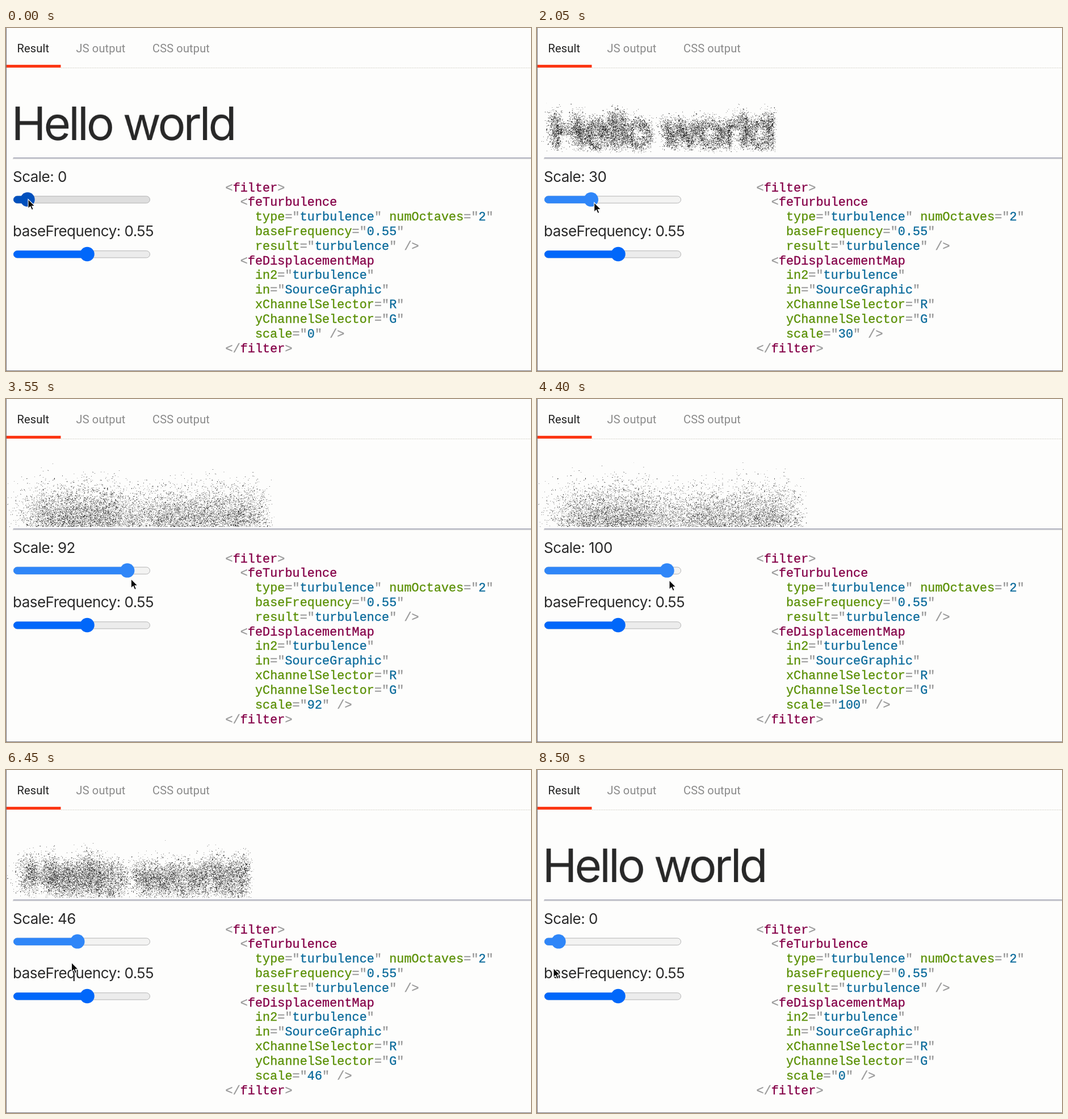
Animation of 925x606 px, one loop 8550 ms. Source, as an HTML page with a canvas:

```html
<!DOCTYPE html>
<html lang="en">
<head>
<meta charset="utf-8">
<title>Displacement filter</title>
<style>
html, body { margin: 0; width: 100%; height: 100%; overflow: hidden; background: #fdfdfc; }
svg, canvas { position: absolute; left: 0; }
svg { top: 0; }
#heading { top: 106px; width: 500px; height: 120.3125px; }
.tab { font: 20px Roboto, sans-serif; letter-spacing: .15px; fill: #8a8a8a; }
.label { font: 26px Inter, sans-serif; letter-spacing: -.52px; fill: #2a2a2a; }
.code { font: 21.87px "Liberation Mono", monospace; white-space: pre; color: #999; }
.code tspan { fill: currentColor; stroke: currentColor; stroke-width: .35px; }
.tag { color: #850048; }
.attr { color: #5c9108; }
.val { color: #0d6c9c; }
</style>
</head>
<body>
<canvas id="heading" width="640" height="154"></canvas>
<svg id="stage" width="925" height="606" viewBox="0 0 925 606">
  <path d="M.5 0V606M0 605.5H925" stroke="#77757f"/>
  <path d="M97 70.5H925" stroke="#d9d7cf" stroke-dasharray="2 1"/>
  <rect x="1" y="65" width="95.5" height="5" fill="#fc3714"/>
  <text class="tab" x="19.5" y="43" style="fill:#222">Result</text>
  <text class="tab" x="123.5" y="43">JS output</text>
  <text class="tab" x="258" y="43">CSS output</text>
  <path d="M12 229.7H925" stroke="#83869a" stroke-width="1.2"/>
  <path d="M12 231.4H925M12.5 229V232" stroke="#dcdcdc"/>
  <text class="label" id="scale" x="12" y="271.5"></text>
  <text class="label" x="12" y="368">baseFrequency: 0.55</text>
  <g id="sliders"></g>
  <g id="code"></g>
  <path id="cursor" d="M0 0V16.6L3.8 13L6.4 19L9.2 17.8L6.7 12H11.9Z" fill="#0a0a0a" stroke="#fff" stroke-width="1.1"/>
</svg>
<script>
const LOOP = 8550, STEP = 50, PRESS = 600;
const $ = id => document.getElementById(id);
const el = (parent, name, attrs, text) => {
  const node = document.createElementNS("http://www.w3.org/2000/svg", name);
  for (const k in attrs) node.setAttribute(k, attrs[k]);
  if (text) node.textContent = text;
  return parent.appendChild(node);
};

// Code listing
const listing = `<filter>
  <feTurbulence
    type="turbulence" numOctaves="2"
    baseFrequency="0.55"
    result="turbulence" />
  <feDisplacementMap
    in2="turbulence"
    in="SourceGraphic"
    xChannelSelector="R"
    yChannelSelector="G"
    scale="0" />
</filter>`;
let scaleValue;
listing.split("\n").forEach((line, row) => {
  const text = el($("code"), "text", { class: "code", x: 386.5, y: 288.5 + row * 25.82 });
  let last = "";
  for (const part of line.match(/\w[\w.]*|\W/g)) {
    const cls = !/\w/.test(part) ? "" : last === '"' ? "val" : /[<\/]/.test(last) ? "tag" : "attr";
    const span = el(text, "tspan", { class: cls }, part);
    if (cls === "val" && line.includes("scale=")) scaleValue = span;
    last = part;
  }
});

// Range sliders
const thumbX = part => 38 + 191 * part;
function makeSlider(y) {
  const box = { x: 13.5, y: y - 5.8, height: 12.2, rx: 6.1 };
  const track = el($("sliders"), "rect", { ...box, width: 240, stroke: "#b4b4b4" });
  const bar = el($("sliders"), "rect", { ...box, "stroke-opacity": .9 });
  const thumb = el($("sliders"), "circle", { cy: y, r: 12.7 });
  return (part, color, back) => {
    const x = thumbX(part);
    track.setAttribute("fill", back);
    bar.setAttribute("width", x - 13.5);
    bar.setAttribute("fill", color);
    bar.setAttribute("stroke", color);
    thumb.setAttribute("cx", x);
    thumb.setAttribute("fill", color);
  };
}
const setScale = makeSlider(302.9);
makeSlider(399.5)(.55, "#0067fa", "#ececec");

// Smooth monotone curve through [time, value] points
function curve(points) {
  const slope = points.slice(1).map(([t, v], i) => (v - points[i][1]) / (t - points[i][0]));
  const tangent = points.map((_, i) => {
    const a = slope[i - 1], b = slope[i];
    return a * b > 0 ? 2 * a * b / (a + b) : 0;
  });
  return t => {
    let i = 0;
    while (i < slope.length - 1 && t >= points[i + 1][0]) i++;
    const [t0, v0] = points[i], [t1, v1] = points[i + 1];
    const w = t1 - t0, u = (t - t0) / w, n = 1 - u;
    return v0 * (1 + 2 * u) * n * n + tangent[i] * w * u * n * n
         + v1 * u * u * (3 - 2 * u) - tangent[i + 1] * w * u * u * n;
  };
}
const scaleAt = curve([[0, 0], [700, 0], [1300, 7], [2950, 67], [3950, 100],
  [4700, 100], [5450, 85], [6450, 46], [7700, 0], [8550, 0]]);
const cursorX = curve([[0, 39], [700, 40], [1300, 55], [2950, 171], [3950, 237],
  [4400, 233], [5450, 198], [6450, 115.5], [7700, 30], [8550, 29]]);
const cursorY = curve([[0, 302.5], [1300, 303.5], [2950, 316], [4400, 320],
  [5450, 327], [6450, 340], [8550, 350]]);

// Perlin turbulence as defined for feTurbulence, seed 0
let seed = 1;
const random = () => seed = seed * 16807 % 2147483647;
const lattice = Array.from({ length: 256 }, (_, i) => i);
const gradients = [0, 1, 2, 3].map(() => lattice.map(() => {
  const x = random() % 512 - 256, y = random() % 512 - 256, len = Math.hypot(x, y) || 1;
  return [x / len, y / len];
}));
for (let i = 255; i > 0; i--) {
  const j = random() % 256;
  [lattice[i], lattice[j]] = [lattice[j], lattice[i]];
}
const ease = t => t * t * (3 - 2 * t);
const mix = (a, b, t) => a + (b - a) * t;
function noise(grad, x, y) {
  const ix = Math.floor(x), iy = Math.floor(y), fx = x - ix, fy = y - iy;
  const corner = (dx, dy) => {
    const g = grad[lattice[(lattice[(ix + dx) & 255] + iy + dy) & 255]];
    return g[0] * (fx - dx) + g[1] * (fy - dy);
  };
  const sx = ease(fx);
  return mix(mix(corner(0, 0), corner(1, 0), sx), mix(corner(0, 1), corner(1, 1), sx), ease(fy));
}
const turbulence = (channel, x, y) => Math.min(1,
  Math.abs(noise(gradients[channel], x, y)) + Math.abs(noise(gradients[channel], 2 * x, 2 * y)) / 2);

// Heading, displaced on a grid of two samples per page unit
const canvas = $("heading"), W = canvas.width, H = canvas.height, DENSITY = 1.28, FREQ = .55;
const ctx = canvas.getContext("2d", { willReadFrequently: true });
const shiftX = new Float32Array(W * H), shiftY = new Float32Array(W * H);
for (let y = 0, i = 0; y < H; y++) {
  for (let x = 0; x < W; x++, i++) {
    const u = (x - 16) / 2 * FREQ + 4096, v = (y - 13) / 2 * FREQ + 4096;
    // Colours pass through 8-bit premultiplied alpha
    const alpha = Math.round(255 * turbulence(3, u, v));
    const shift = channel => 2 * (alpha && Math.round(alpha * turbulence(channel, u, v)) / alpha) - 1;
    shiftX[i] = shift(0);
    shiftY[i] = shift(1);
  }
}
ctx.scale(DENSITY, DENSITY);
ctx.font = "82px Inter, sans-serif";
ctx.letterSpacing = "-4.05px";
ctx.fillStyle = "#282828";
ctx.fillText("Hello world", 9.5, 92);
const plain = ctx.getImageData(0, 0, W, H);
const moved = ctx.createImageData(W, H);
const from = new Uint32Array(plain.data.buffer), to = new Uint32Array(moved.data.buffer);

function displace(scale) {
  for (let y = 0, i = 0; y < H; y++) {
    for (let x = 0; x < W; x++, i++) {
      const sx = Math.floor(x + .5 + scale * shiftX[i]), sy = Math.floor(y + .5 + scale * shiftY[i]);
      to[i] = sx >= 0 && sx < W && sy >= 0 && sy < H ? from[sy * W + sx] : 0;
    }
  }
  ctx.putImageData(moved, 0, 0);
}

let shown = -1;
function draw(now) {
  const t = Math.floor(now % LOOP / STEP) * STEP;
  const scale = Math.round(scaleAt(t));
  if (scale !== shown) {
    shown = scale;
    displace(scale);
    $("scale").textContent = "Scale: " + scale;
    scaleValue.textContent = scale;
  }
  if (t < PRESS) setScale(scale / 100, "#0050bd", "#dedede");
  else setScale(scale / 100, "#2f86f8", "#f3f3f2");
  $("cursor").setAttribute("transform", `translate(${cursorX(t)} ${cursorY(t)})`);
}
const start = performance.now();
function tick() {
  draw(performance.now() - start);
  requestAnimationFrame(tick);
}
tick();
</script>
</body>
</html>
```
